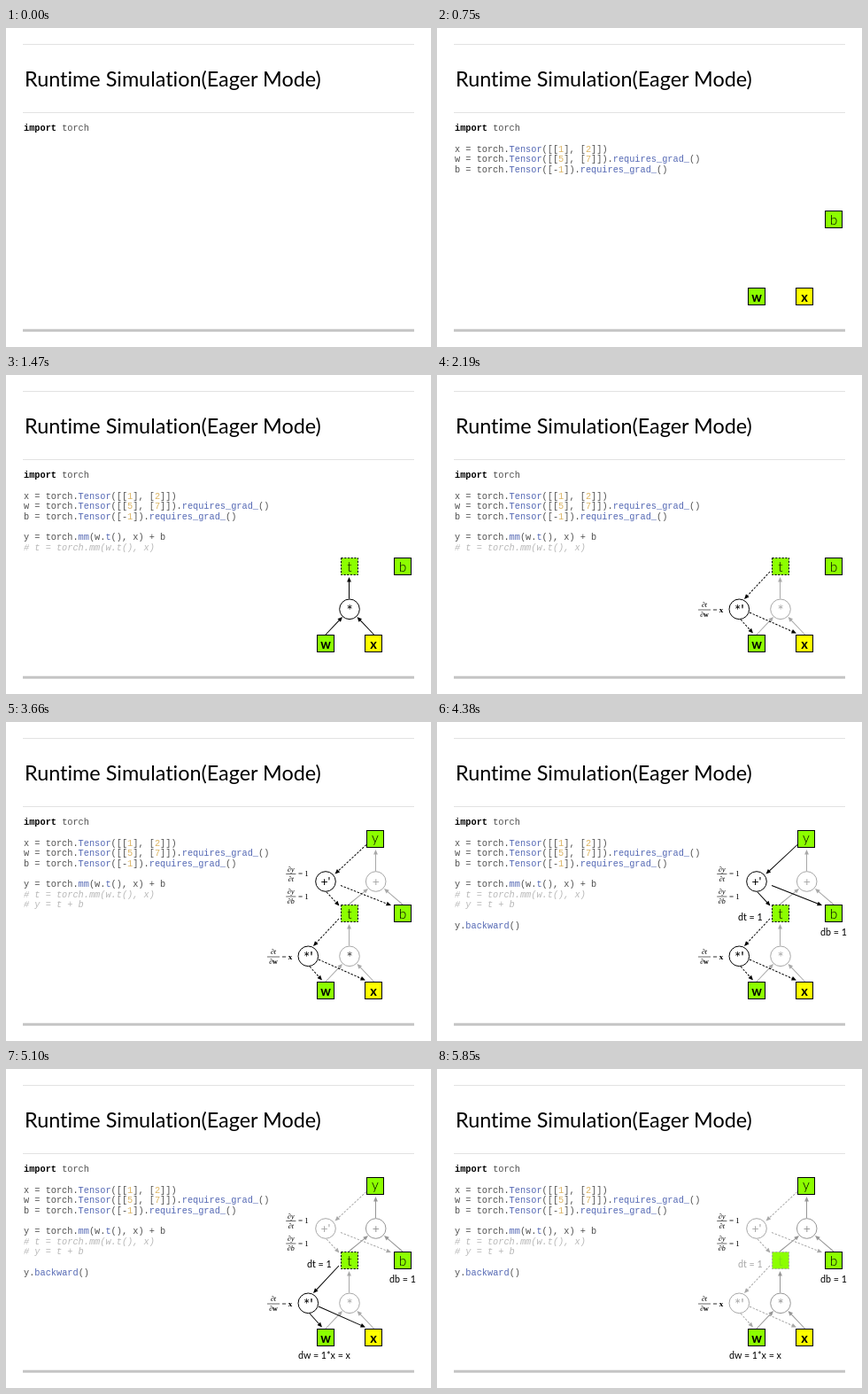
An HTML page that plays this animation: 480x360 px, repeating every 6570 ms.

```html
<!DOCTYPE html>
<html lang="en">
<head>
<meta charset="utf-8">
<title>Runtime Simulation</title>
<style>
html, body { margin: 0; width: 100%; height: 100%; overflow: hidden; background: #fff; }
svg { display: block; width: 480px; height: 360px; }
text { font-family: Lato, sans-serif; font-variant-ligatures: none; white-space: pre; }
.title { font-size: 23.4px; }
.code { font: 10.28px "Liberation Mono", monospace; fill: #505050; }
.code .key { font-weight: bold; fill: #000; }
.code .fn { fill: #5468b4; }
.code .num { fill: #dcb463; }
.code.note { font-style: italic; fill: #b8b8b8; }
.mid { text-anchor: middle; }
.label { font-size: 10.7px; }
.math { font: 9px "Liberation Serif", serif; }
.math.mid { font-size: 8px; }
</style>
</head>
<body>
<svg viewBox="0 0 480 360">
  <path d="M19 18.5H461M19 95.5H461" stroke="#e2e2e2"/>
  <path d="M19 341.2H461" stroke="#c5c5c5" stroke-width="3"/>
  <text class="title" x="21" y="66">Runtime Simulation(Eager Mode)</text>
  <g id="scene"></g>
</svg>
<script>
const LOOP = 6570;
const STARTS = [0, 750, 1470, 2190, 2910, 3660, 4380, 5100, 5850];
const GRAY = '#a8a8a8', DONE = '#969696', BLACK = '#000';
const GREEN = '#8cff00', YELLOW = '#ffff00';

// [first step, row, text]
const CODE = [
  [1, 2, 'x = torch.Tensor([[1], [2]])'],
  [1, 3, 'w = torch.Tensor([[5], [7]]).requires_grad_()'],
  [1, 4, 'b = torch.Tensor([-1]).requires_grad_()'],
  [2, 6, 'y = torch.mm(w.t(), x) + b'],
  [2, 7, '# t = torch.mm(w.t(), x)'],
  [4, 8, '# y = t + b'],
  [6, 10, 'y.backward()']
];

// Edges: x1, y1, x2, y2
const EDGES = {
  mul: [[361, 293, 380, 273], [415.5, 293, 396.5, 273], [387.5, 252.5, 387.5, 228]],
  add: [[387, 206, 409, 188], [448, 206, 427, 188], [417.5, 168.5, 417.5, 144]],
  mulBack: [[376, 222, 347, 253], [343, 276, 357, 291.5], [353, 268, 406, 291.5]],
  addBack: [[407, 138.5, 371.5, 171.5], [362, 192, 376.5, 207.5], [378, 184.5, 435, 207]]
};

function codeLine(row, html, cls = '') {
  return `<text class="code ${cls}" x="20" y="${116.2 + row * 11.65}">${html}</text>`;
}

function highlight(text) {
  return text.replace(/(?<=\.)\w+(?=\()|\d/g, part =>
    `<tspan class="${/\d/.test(part) ? 'num' : 'fn'}">${part}</tspan>`);
}

function arrow([x1, y1, x2, y2], color, dashed) {
  const length = Math.hypot(x2 - x1, y2 - y1);
  const angle = Math.atan2(y2 - y1, x2 - x1) * 180 / Math.PI;
  return `<g transform="translate(${x1} ${y1}) rotate(${angle})">
    <path d="M0 0H${length - 4}" stroke="${color}"
      ${dashed ? 'stroke-dasharray="2.4 1.6"' : ''}/>
    <path d="M${length} 0l-5.5 -2.4v4.8z" fill="${color}"/></g>`;
}

function arrows(name, color, dashed = false) {
  return EDGES[name].map(edge => arrow(edge, color, dashed)).join('');
}

function op(x, y, sign, color, ink = color) {
  const dy = sign[0] === '*' ? 7.5 : 4.8;
  const size = sign[0] === '*' ? 17 : 14;
  return `<circle cx="${x}" cy="${y}" r="11.3" fill="#fff" stroke="${color}"/>
    <text class="mid" x="${x}" y="${y + dy}" font-size="${size}" fill="${ink}">${sign}</text>`;
}

function node(x, y, name, { fill = GREEN, weight = 300, dy = 5.5, size = 15.5, ink = BLACK, edge = BLACK, dash = '' } = {}) {
  return `<rect x="${x - 9.5}" y="${y - 9.5}" width="19" height="19" fill="${fill}"
      stroke="${edge}" stroke-dasharray="${dash}"/>
    <text class="mid" x="${x}" y="${y + dy}" font-size="${size}" font-weight="${weight}" fill="${ink}">${name}</text>`;
}

function fraction(x, y, top, bottom, value, half) {
  return `<path d="M${x - half} ${y}h${2 * half}" stroke="#000" stroke-width=".6"/>
    <text class="math mid" x="${x}" y="${y - 3}">${top}</text>
    <text class="math mid" x="${x}" y="${y + 8}">${bottom}</text>
    <text class="math" x="${x + half + 2.5}" y="${y + 2.8}">= ${value}</text>`;
}

const italic = s => `<tspan font-style="italic">${s}</tspan>`;
const bold = s => `<tspan font-weight="bold">${s}</tspan>`;
const label = (x, y, s, color = BLACK) =>
  `<text class="label" x="${x}" y="${y}" fill="${color}">${s}</text>`;

// Color of an operation that is first in use, then recorded, then finished
const forwardColor = (step, recorded, finished) =>
  step >= finished ? DONE : step >= recorded ? GRAY : BLACK;

function scene(step) {
  const out = [codeLine(0, '<tspan class="key">import</tspan> torch')];
  const from = (first, ...parts) => { if (step >= first) out.push(...parts); };

  for (const [first, row, text] of CODE) {
    from(first, text[0] === '#' ? codeLine(row, text, 'note') : codeLine(row, highlight(text)));
  }

  const mulColor = forwardColor(step, 3, 8);
  const addColor = forwardColor(step, 5, 7);
  const mulBackColor = step > 7 ? GRAY : BLACK;
  const addBackColor = step > 6 ? GRAY : BLACK;
  const mulInk = step === 4 || step === 5 ? '#444' : mulColor;

  from(2, arrows('mul', mulColor));
  from(4, arrows('add', addColor));
  from(3, arrows('mulBack', mulBackColor, step !== 7));
  from(5, arrows('addBack', addBackColor, step !== 6));

  from(2, op(388, 264.3, '*', mulColor, mulInk));
  from(4, op(417.7, 180, '+', addColor));
  from(3, op(341.3, 264.3, "*'", mulBackColor));
  from(5, op(361, 180, "+'", addBackColor));

  from(1,
    node(361, 303, 'w', { weight: 700, size: 14.5 }),
    node(415, 303, 'x', { weight: 700, size: 14.5, fill: YELLOW }),
    node(448, 216, 'b', { dy: 6 }));
  from(2, node(388, 216, 't', {
    dy: 6,
    dash: '2.2 1.5',
    ink: step > 7 ? '#79d81c' : BLACK,
    edge: step > 7 ? GRAY : BLACK
  }));
  from(4, node(417, 132, 'y', { dy: 4 }));

  from(3, fraction(302, 265, italic('∂t'), italic('∂') + bold('w'), bold('x'), 7));
  from(5,
    fraction(321.8, 171.5, italic('∂y'), italic('∂t'), '1', 5.6),
    fraction(321.8, 197, italic('∂y'), italic('∂b'), '1', 5.6));
  from(6,
    label(340, 224.3, 'dt = 1', step > 7 ? GRAY : BLACK),
    label(433, 241, 'db = 1'));
  from(7, label(330, 327, 'dw = 1*x = x'));
  return out.join('');
}

const stage = document.getElementById('scene');
let shown = -1;

function tick() {
  const time = performance.now() % LOOP;
  const step = STARTS.filter(start => start <= time).length - 1;
  if (step !== shown) stage.innerHTML = scene(shown = step);
  requestAnimationFrame(tick);
}
tick();
</script>
</body>
</html>
```
